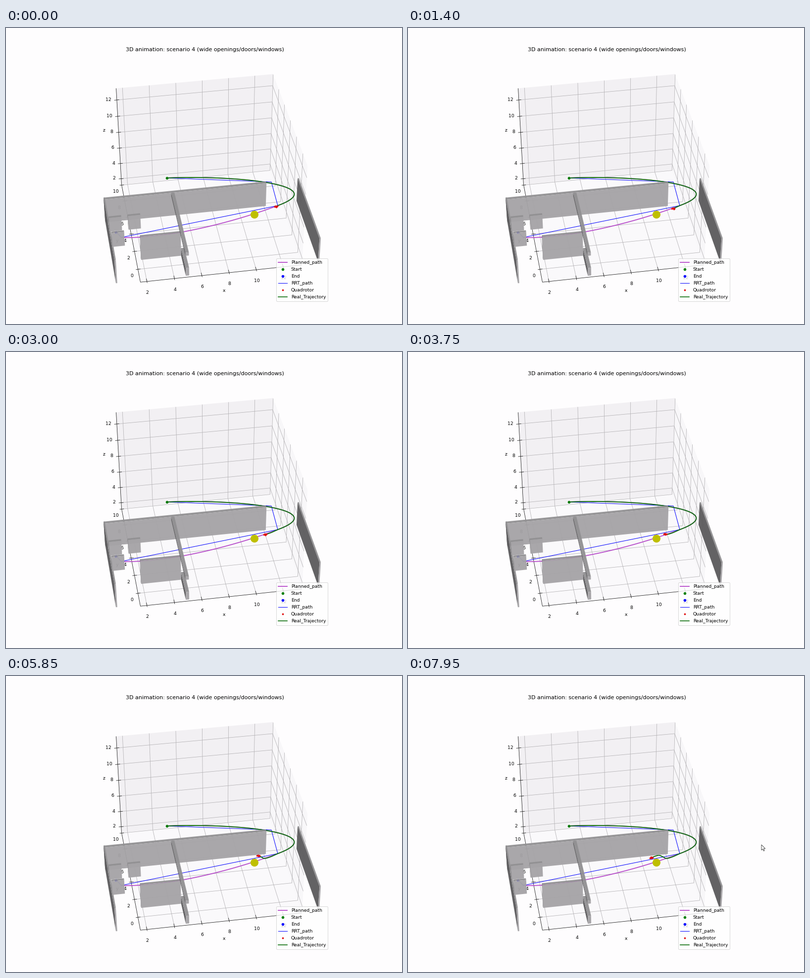
Recreate the animation shown at these times as a matplotlib script. Size 800 by 600 pixels, loop 8000 ms.

```python
import itertools

import numpy as np
import matplotlib.pyplot as plt
from matplotlib.animation import FuncAnimation
from matplotlib.collections import LineCollection
from matplotlib.lines import Line2D
from matplotlib.patches import Circle, Polygon

FRAMES, STEP = 160, 50
BG = "#fefdfe"
ORCHID, BLUE, GREEN, RED = "#b84fcb", "#0000ff", "#107010", "#e01010"
FACE, TOP, DARK = "#a5a3a6", "#919092", "#5b5a5c"

# Axis limits and the seven visible corners of the room on screen;
# each key says low (0) or high (1) for x, y and z
LO, HI = np.array([1.53, -1.4, 1.21]), np.array([13.39, 10.06, 13.4])
CORNERS = {(0, 1, 1): (223, 122), (1, 1, 1): (539, 93),
           (0, 1, 0): (233.5, 318), (1, 1, 0): (533, 288),
           (0, 0, 0): (271, 515), (1, 0, 0): (598.6, 479.5),
           (1, 0, 1): (609, 280)}


def fit_camera():
    rows, rhs = [], []
    for key, (u, v) in CORNERS.items():
        p = np.append(np.where(key, HI, LO), 1)
        o = np.zeros(4)
        rows += [np.r_[p, o, -u * p[:3]], np.r_[o, p, -v * p[:3]]]
        rhs += [u, v]
    return np.append(np.linalg.lstsq(rows, rhs, rcond=None)[0], 1).reshape(3, 4)


CAMERA = fit_camera()


def cam(x, y, z):
    p = CAMERA @ [x, y, z, 1]
    return p[:2] / p[2]


def bezier(a, b, c, d, n=100):
    t = np.linspace(0, 1, n)[:, None]
    a, b, c, d = np.array([a, b, c, d], float)
    s = 1 - t
    return s**3 * a + 3 * s * s * t * b + 3 * s * t * t * c + t**3 * d


def spline(points, n):
    """Catmull-Rom curve with n samples for each span."""
    p = np.array(points, float)
    p = np.vstack([2 * p[0] - p[1], p, 2 * p[-1] - p[-2]])
    t = np.linspace(0, 1, n, endpoint=False)[:, None]
    parts = [b + 0.5 * t * (c - a + t * (2 * a - 5 * b + 4 * c - d
                                         + t * (3 * (b - c) + d - a)))
             for a, b, c, d in zip(p, p[1:], p[2:], p[3:])]
    return np.vstack(parts + [p[-2:-1]])


fig = plt.figure(figsize=(12, 9), dpi=200 / 3, facecolor=BG)
ax = fig.add_axes([0, 0, 1, 1])
ax.set(xlim=(0, 800), ylim=(600, 0))
ax.axis("off")


def poly(points, color, z, alpha=1.0):
    ax.add_patch(Polygon(points, closed=True, fc=color, ec="none",
                         alpha=alpha, zorder=z))


def lines(segments, color, lw, z):
    ax.add_collection(LineCollection(segments, colors=color, lw=lw, zorder=z))


def path(points, color, lw):
    return ax.plot(*np.transpose(points), color=color, lw=lw, zorder=3)[0]


def label(place, s, shift=(0, 0), size=10):
    x, y = np.add(place, shift)
    ax.text(x, y, s, fontsize=size, ha="center", va="center_baseline", zorder=2)


def box(x, y, z, dx, dy, dz):
    """Shaded cuboid: the left, top and front sides face the viewer."""
    X, Y, Z = x + dx, y + dy, z + dz
    sides = [([(x, y, z), (x, Y, z), (x, Y, Z), (x, y, Z)], DARK),
             ([(x, y, Z), (X, y, Z), (X, Y, Z), (x, Y, Z)], TOP),
             ([(x, y, z), (X, y, z), (X, y, Z), (x, y, Z)], FACE)]
    for side, color in sides:
        poly([cam(*p) for p in side], color, 4, 0.95)


# Panes, grid, axes and ticks
(x0, y0, z0), (x1, y1, z1) = LO, HI
for axis, end, color in ((1, 1, "#f2f0f3"), (0, 1, "#f8f7f9"),
                         (2, 0, "#faf9fb")):
    ring = [list(c) for c in ((0, 0), (1, 0), (1, 1), (0, 1))]
    for c in ring:
        c.insert(axis, end)
    poly([cam(*np.where(c, HI, LO)) for c in ring], color, 0)

grid, ticks = [], []
for n in range(0, 13, 2):
    if n > x0:
        grid += [[(n, y0, z0), (n, y1, z0)], [(n, y1, z0), (n, y1, z1)]]
        ticks.append([(n, y0 - 0.16, z0), (n, y0 + 0.31, z0)])
        label(cam(n, y0, z0), str(n), (0.8, 21.3))
    if n < y1:
        grid += [[(x0, n, z0), (x1, n, z0)], [(x1, n, z0), (x1, n, z1)]]
        ticks.append([(x0 - 0.15, n, z0), (x0 + 0.18, n, z0)])
        label(cam(x0, n, z0), str(n), (-11.8, 12.5))
    if n > z0:
        grid += [[(x0, y1, n), (x1, y1, n)], [(x1, y1, n), (x1, y0, n)]]
        ticks.append([(x0 - 0.19, y1, n), (x0 + 0.18, y1, n)])
        label(cam(x0, y1, n), str(n), (-11 - 3 * len(str(n)), -1.5))
edges = [[(x0, y1, z1), (x0, y1, z0)], [(x0, y1, z0), (x0, y0, z0)],
         [(x0, y0, z0), (x1, y0, z0)]]
lines([[cam(*p) for p in s] for s in grid], "#b2b0b3", 0.85, 1)
lines([[cam(*p) for p in s] for s in ticks + edges], "#111111", 0.85, 2)

label((440, 531.5), "x")
label((224, 430), "y")
label((198, 206.5), "z")
label((402, 42.6), "3D animation: scenario 4 (wide openings/doors/windows)",
      size=12)

# Paths and end points
START, TURN, GOAL = (325, 304), (549, 360), (233, 424.5)
route = bezier(START, (470, 298), (660, 319), TURN)
plan = bezier(TURN, (453, 396), (322, 428), GOAL)
path(np.vstack([route, plan]), ORCHID, 2)
path([START, (536, 312), TURN, GOAL, (222, 413)], BLUE, 1.1)
ax.plot(*START, "o", color="#008000", ms=6, mew=0, zorder=3)
ax.plot(222, 414, "o", color=BLUE, ms=6, mew=0, zorder=3)

# Obstacles from back to front
box(-0.15, 6.75, 0, 12.55, 0.25, 3)
for x in (-0.15, 14.9):
    box(x, -0.25, 0, 0.1, 7.25, 3)
for x, y in ((0.05, 5.6), (1.5, 5.6), (0.05, 3.8)):
    box(x, y, 0, 0.95, 0.2, 1.8)
box(2, 2, 0, 3, 0.2, 3)
box(5, -0.25, 0, 0.25, 2.25, 1)
box(5, -0.25, 2.6, 0.25, 7, 0.4)

ax.add_patch(Circle((502, 378.3), 8, fc="#bfbf00", ec="none", zorder=6))

# Legend
dot = dict(ls="none", marker="o", mew=0)
entries = {"Planned_path": dict(color=ORCHID, lw=2),
           "Start": dict(color="#008000", ms=6, **dot),
           "End": dict(color=BLUE, ms=6, **dot),
           "RRT_path": dict(color=BLUE, lw=1.1),
           "Quadrotor": dict(color=RED, ms=4, **dot),
           "Real_Trajectory": dict(color=GREEN, lw=1.8)}
ax.legend([Line2D([], [], **style) for style in entries.values()], entries,
          loc="lower right", bbox_to_anchor=(650, 553.7),
          bbox_transform=ax.transData, borderaxespad=0, labelspacing=0.54,
          fontsize=10, framealpha=0.8).set_zorder(7)

# Quadrotor: places at equal time steps, one sample per frame
flight = spline([(545, 361.8), (534.5, 366.5), (522.3, 369.8), (514.5, 366.3),
                 (505.8, 363.6), (491.3, 368.3)], FRAMES // 5)[:FRAMES]
ARMS = np.array([(-2.5, 0.4), (2.5, -0.4), (-0.7, -1.2), (0.7, 1.2)])

trail = path(route, GREEN, 2.1)
arms, = ax.plot([], [], color=RED, lw=1.2, zorder=3.5)
rotors, = ax.plot([], [], color=RED, ms=4, zorder=3.5, **dot)

ARROW = np.array([(0, 0), (0, 11), (2.6, 8.6), (4.4, 12.7), (6.1, 12),
                  (4.4, 8), (7.8, 8)])
pointer = Polygon(ARROW, closed=True, fc="white", ec="#333333", lw=0.9,
                  zorder=8)
ax.add_patch(pointer)
MOVES = (6900, 7000, 7950)


def draw(i):
    trail.set_data(*np.vstack([route, flight[:i + 1]]).T)
    spots = flight[i] + ARMS
    for part in (arms, rotors):
        part.set_data(*spots.T)
    t = i * STEP
    pointer.set_visible(t >= MOVES[0])
    pointer.set_xy(ARROW + [np.interp(t, MOVES, (776, 756.5, 714)),
                            np.interp(t, MOVES, (394, 383, 342))])
    return trail, arms, rotors, pointer


anim = FuncAnimation(fig, draw, frames=FRAMES, interval=STEP, repeat=True,
                     repeat_delay=0, init_func=lambda: draw(0))
plt.show()
```
